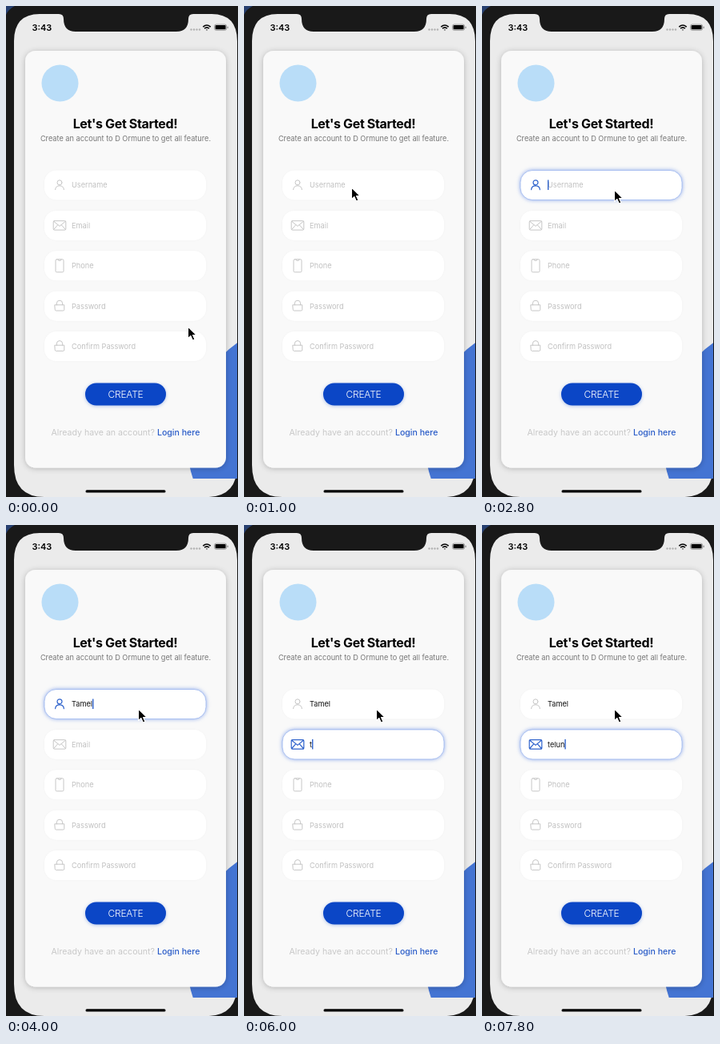
Write an HTML page that moves like this. It is 290 px wide and 614 px high and loops after 8000 ms.

```html
<!DOCTYPE html>
<html lang="en">
<head>
<meta charset="utf-8">
<title>Sign-up form</title>
<style>
html, body { margin: 0; width: 100%; height: 100%; overflow: hidden; background: #191919; }
svg { display: block; width: 290px; height: 614px; font-family: Inter, sans-serif; }
.box { fill: #fff; filter: drop-shadow(0 0 1px #00000008); }
.icon { fill: none; stroke: #c6c6c6; stroke-width: 1; stroke-linejoin: round; stroke-linecap: round; }
.label { font-size: 9.2px; fill: #c0c0c0; }
.filled { fill: #111; }
.on .box { stroke: #9db7ee; stroke-width: .8; filter: drop-shadow(0 0 2.5px #5b86e6b0); }
.on .icon { stroke: #2f63cc; stroke-width: 1.2; }
</style>
</head>
<body>
<svg viewBox="0 0 290 614">
  <defs>
    <clipPath id="safe"><path d="M0 0H289V591H0Z"/></clipPath>
    <filter id="soft" x="-20%" y="-20%" width="140%" height="140%">
      <feDropShadow dx="0" dy="1" stdDeviation="3.5" flood-color="#000" flood-opacity=".24"/>
    </filter>
  </defs>
  <rect width="290" height="614" fill="#191919"/>
  <path d="M0 0H11Q3 4 0 11Z" fill="#263f70"/>
  <path d="M10 44Q10 10 42 10H66Q72 10 72 16Q72 32 87 32H213Q228 32 228 16Q228 10 234 10H257Q289 10 289 44V574Q289 614 251 614H48Q10 614 10 574Z" fill="#ebebeb"/>
  <circle cx="376" cy="543.5" r="150" fill="#4474d3" clip-path="url(#safe)"/>

  <text x="32.5" y="31" font-size="11" font-weight="600">3:43</text>
  <g fill="#b2b2b2">
    <circle cx="231.5" cy="29.5" r="1.2"/><circle cx="235" cy="29.5" r="1.2"/>
    <circle cx="238.5" cy="29.5" r="1.2"/><circle cx="242" cy="29.5" r="1.2"/>
  </g>
  <g fill="none" stroke="#000" stroke-width="1.6">
    <path d="M246.3 26.2Q251 21.8 255.7 26.2M248.1 28.2Q251 25.5 253.9 28.2"/>
    <path d="M249.8 29.4H252.2L251 30.7Z" fill="#000" stroke="none"/>
  </g>
  <rect x="260.6" y="23.1" width="15" height="7.2" rx="2" fill="none" stroke="#777" stroke-width=".7"/>
  <rect x="261.6" y="24.1" width="13" height="5.2" rx="1"/>
  <rect x="276.6" y="25.4" width="1" height="2.6" rx=".5" fill="#777"/>

  <rect x="24" y="56" width="251" height="521.5" rx="13" fill="#f9f9f9" filter="url(#soft)"/>
  <circle cx="67.5" cy="96.5" r="23" fill="#b9ddf8"/>
  <g text-anchor="middle">
    <text x="149" y="152.5" font-size="16" font-weight="700" letter-spacing="-.35">Let's Get Started!</text>
    <text x="149.5" y="169" font-size="9.2" fill="#777">Create an account to D Ormune to get all feature.</text>
  </g>

  <g id="fields"></g>

  <rect x="99" y="471.5" width="101" height="28" rx="14" fill="#0b46c6" style="filter:drop-shadow(0 1px 2px #0b46c650)"/>
  <text x="149.5" y="490" font-size="12" font-weight="300" fill="#fff" text-anchor="middle" letter-spacing="-.2">CREATE</text>
  <text x="149.5" y="537" font-size="10.6" fill="#c8c8c8" text-anchor="middle">Already have an account? <tspan fill="#2a5cc8" font-weight="500">Login here</tspan></text>
  <rect x="99.5" y="605.3" width="100" height="3.2" rx="1.6"/>

  <rect id="caret" width="1.4" height="12.5" fill="#2f63cc"/>
  <path id="mouse" d="M0 0V14.6L3.4 11.5L5.8 17L8.4 15.9L6 10.5H10.6Z" stroke="#fff" stroke-width="1.1" stroke-linejoin="round"/>
</svg>
<script>
const $ = id => document.getElementById(id);
const icons = {
  user: 'M70 -3.2A3 3 0 1 1 64 -3.2A3 3 0 1 1 70 -3.2M61.6 5.6Q62 .8 67 .8T72.4 5.6',
  mail: 'M60.5 -5.7H73.5Q74.8 -5.7 74.8 -4.4V4.4Q74.8 5.7 73.5 5.7H60.5Q59.2 5.7 59.2 4.4V-4.4Q59.2 -5.7 60.5 -5.7M59.7 -5.1L67 1L74.3 -5.1M59.7 5.1L64.8 -.8M74.3 5.1L69.2 -.8',
  phone: 'M63.5 -8H70.5Q72 -8 72 -6.5V6.5Q72 8 70.5 8H63.5Q62 8 62 6.5V-6.5Q62 -8 63.5 -8M65 -7.6Q65 -6.5 66 -6.5H68Q69 -6.5 69 -7.6',
  lock: 'M61.2 -1.4H72.8V4.4Q72.8 5.8 71.4 5.8H62.6Q61.2 5.8 61.2 4.4ZM63.4 -1.4V-3.4A3.6 3.6 0 0 1 70.6 -3.4V-1.4'
};
const rows = [['Username', 'user'], ['Email', 'mail'], ['Phone', 'phone'], ['Password', 'lock'], ['Confirm Password', 'lock']];
const rowY = i => 224 + i * 50.4;

$('fields').innerHTML = rows.map(([name, icon], i) => `
  <g transform="translate(0 ${rowY(i)})">
    <rect class="box" x="48" y="-18.5" width="202" height="37" rx="15"/>
    <path class="icon" d="${icons[icon]}"/>
    <text class="label" x="82" y="3.3">${name}</text>
  </g>`).join('');
const fields = [...$('fields').children];
const labels = fields.map(f => f.querySelector('text'));

// [time, value]; each value holds until the next
const mouse = [[0, [227.5, 401]], [200, [217, 378]], [600, [180, 296]], [800, [146, 240]], [1000, [134.5, 227]],
  [1800, [221, 231]], [2200, [204, 231]], [2400, [184, 230.5]], [2600, [168, 230]], [2800, [165.5, 230]]];
const focus = [[0, -1], [1800, 0], [4400, 1]];
const caret = [[0, 1], [2200, 0], [2600, 1], [4800, 0], [5200, 1], [5600, 0], [6000, 1]];
const typed = [
  [[0, ''], [3400, 'T'], [3600, 'Ta'], [3800, 'Tame'], [4000, 'Tamel']],
  [[0, ''], [6000, 't'], [6600, 'te'], [7000, 'tel'], [7400, 'telu'], [7800, 'telun']]
];
const at = (steps, t) => steps.findLast(s => s[0] <= t)[1];

function draw(t) {
  const active = at(focus, t);
  fields.forEach((f, i) => f.classList.toggle('on', i === active));
  typed.forEach((steps, i) => {
    const text = at(steps, t);
    labels[i].textContent = text || rows[i][0];
    labels[i].classList.toggle('filled', !!text);
  });
  const shown = active >= 0 && at(caret, t);
  $('caret').setAttribute('opacity', shown ? 1 : 0);
  if (shown) {
    const text = at(typed[active], t);
    $('caret').setAttribute('x', 82 + (text ? labels[active].getComputedTextLength() : 0));
    $('caret').setAttribute('y', rowY(active) - 6.5);
  }
  $('mouse').setAttribute('transform', `translate(${at(mouse, t)})`);
}

const start = performance.now();
function tick(now) {
  draw(Math.max(0, now - start) % 8000);
  requestAnimationFrame(tick);
}
draw(0);
requestAnimationFrame(tick);
</script>
</body>
</html>
```
